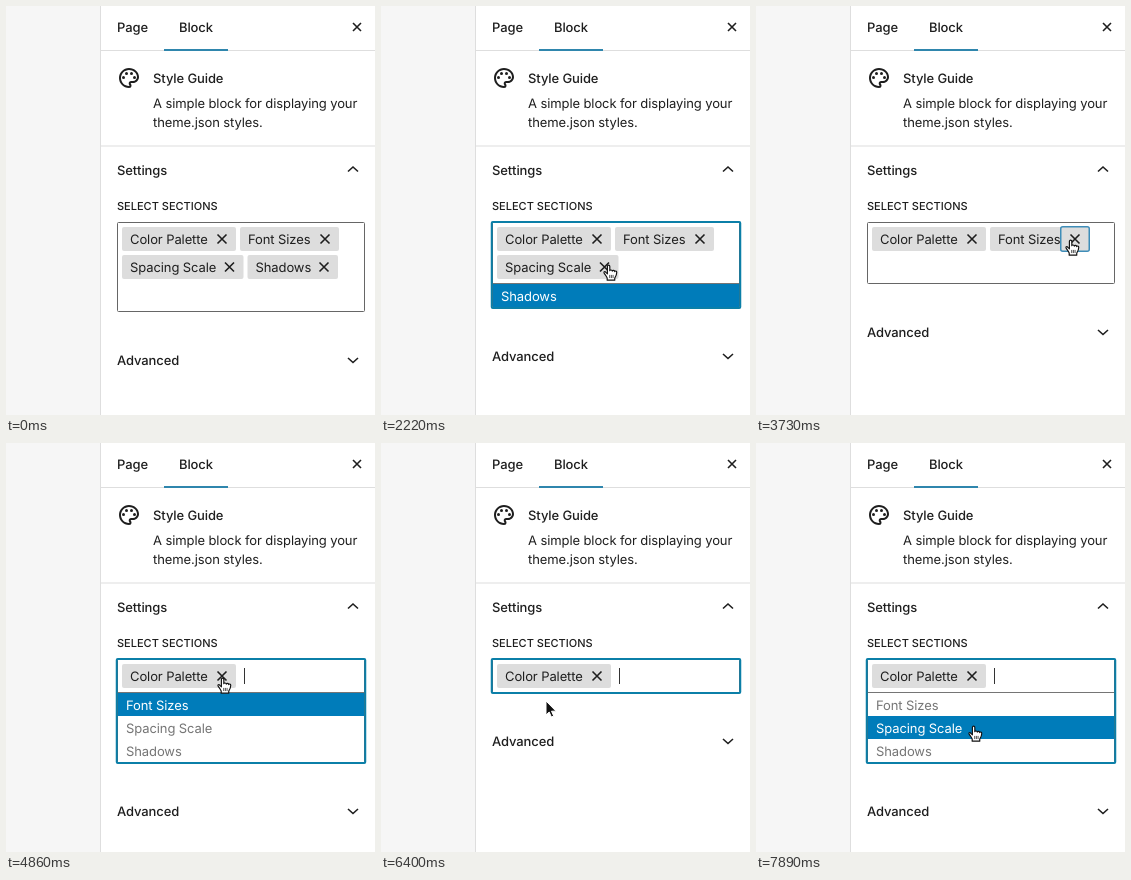
An HTML page that plays this animation: 369x409 px, repeating every 8000 ms.

```html
<!DOCTYPE html>
<html lang="en">
<head>
<meta charset="utf-8">
<title>Block settings</title>
<style>
  html, body { margin: 0; width: 100%; height: 100%; overflow: hidden; background: #fff; }
  svg { display: block; }
  text {
    font: 13px Inter, "Liberation Sans", sans-serif; letter-spacing: -.1px;
    fill: #1e1e1e; text-rendering: geometricPrecision;
  }
  .medium { font-weight: 500; }
  .label { font-size: 11px; font-weight: 500; letter-spacing: 0; }
  .line { fill: none; stroke: #1e1e1e; stroke-width: 1.6; }
  .rule { fill: #dedede; }
  .tab { fill: #2f86ad; }
  .ring { fill: none; stroke: #0b7fa8; stroke-width: 2; }
  .press { fill: none; stroke: #3f8db8; stroke-width: 1.5; }
  .box { fill: #fff; stroke: #666; stroke-width: 1; }
  .token { fill: #ddd; }
  .option { fill: #757575; }
  .bar { fill: #007cba; }
  .picked { fill: #fff; }
  .caret { fill: #333; }
  .hand { fill: #fff; stroke: #111; stroke-width: 1.1; stroke-linejoin: round; }
  .arrow { fill: #111; stroke: #fff; stroke-width: 1; }
  .beam { fill: none; stroke: #333; stroke-width: 1; }
</style>
</head>
<body>
<svg width="369" height="409" viewBox="0 0 369 409">
  <rect width="94" height="409" fill="#f6f6f6"/>
  <rect class="rule" x="94" width="1" height="409"/>
  <rect class="rule" x="95" y="44" width="274" height="1"/>
  <rect class="rule" x="95" y="139.5" width="274" height="1"/>
  <rect class="tab" x="158" y="43" width="64" height="2"/>

  <text class="medium" x="111" y="25.5">Page</text>
  <text class="medium" x="173" y="25.5">Block</text>
  <path class="line" d="M347 17l8 8m0-8l-8 8"/>

  <g transform="translate(111 60)" fill="#1e1e1e">
    <path d="M12 22C6.5 22 2 17.5 2 12S6.5 2 12 2s10 4 10 9c0 3.3-2.7 6-6 6h-1.8c-.3 0-.5.2-.5.5 0 .1 0 .2.1.3.4.5.7 1.1.7 1.7A2.5 2.5 0 0 1 12 22zm0-18c-4.4 0-8 3.6-8 8s3.6 8 8 8c.3 0 .5-.2.5-.5a.5.5 0 0 0-.1-.3c-.4-.5-.7-1.1-.7-1.7a2.5 2.5 0 0 1 2.5-2.5H16c2.2 0 4-1.8 4-4 0-3.9-3.6-7-8-7z"/>
    <circle cx="6.5" cy="11.5" r="1.5"/><circle cx="9.5" cy="7.5" r="1.5"/>
    <circle cx="14.5" cy="7.5" r="1.5"/><circle cx="17.5" cy="11.5" r="1.5"/>
  </g>
  <text class="medium" x="147" y="76.5">Style Guide</text>
  <text x="147" y="102">A simple block for displaying your</text>
  <text x="147" y="120.5">theme.json styles.</text>

  <text class="medium" x="111" y="168.5">Settings</text>
  <path class="line" d="M342 165.500l5-4.500 5 4.500"/>
  <text class="label" x="111" y="204">SELECT SECTIONS</text>

  <g id="field"></g>
  <g id="advanced">
    <text class="medium" x="111" y="4.5">Advanced</text>
    <path class="line" d="M342-2l5 4.500 5-4.500"/>
  </g>

  <g id="cursor">
    <g id="hand" class="hand" transform="translate(-6.8 -8.6) scale(1.05)">
      <path d="M4 9L2.6 7.6C1.6 6.4.2 7 .9 8.3 2 10 3 11 3.8 13v2H11v-2c1.5-2 1.9-3.5 1.9-5.5 0-1.5-1.7-1.5-1.9-.5-.1-1.7-2.1-1.7-2.3-.5C8.5 5 6.5 5 6.3 6V2C6.3.2 4 .2 4 2z"/>
      <path d="M6.2 10v3M7.8 10v3M9.4 10v3" stroke-width=".7"/>
    </g>
    <path id="arrow" class="arrow" d="M-5-8V6l3.2-3 2.2 5 2.3-1-2.2-4.8H5z"/>
    <path id="beam" class="beam" d="M-2.500-6.500Q0-6.500 0-5 0-6.500 2.500-6.500M0-5V5M-2.500 6.500Q0 6.500 0 5 0 6.500 2.500 6.500M-1.500 2h3"/>
  </g>
</svg>
<script>
const LOOP = 8000, TOP = 216, ROW = 28, ITEM = 23;
const $ = id => document.getElementById(id);

const sections = [
  { name: "Color Palette", x: 116, row: 0, w: 114 },
  { name: "Font Sizes", x: 234, row: 0, w: 99 },
  { name: "Spacing Scale", x: 116, row: 1, w: 121.5 },
  { name: "Shadows", x: 241.5, row: 1, w: 90.5 }
];
const rowsFor = [1, 1, 2, 2, 3];
const caretFor = [[120, 225], [238, 225], [120, 253], [246, 253]];

// time, tokens left, mode
const steps = [
  [0, 4, "idle"], [1300, 4, "press"], [1550, 3, "open"],
  [2320, 3, "press"], [2500, 2, "open"],
  [3630, 2, "press"], [3990, 1, "open"],
  [4910, 1, "press"], [5090, 0, "open"],
  [6400, 1, "focus"], [7300, 1, "open"]
];

const caretOn = [[1550, 2090], [2500, 3000], [3500, 3630], [3990, 4490],
  [4860, 4910], [5090, 5590], [6090, 7390], [7890, 8000]];

// time, centre x, centre y, shape from that time on
const path = [
  [390, 338, 392, "arrow"], [610, 334, 364, "arrow"], [790, 334, 364, "arrow"],
  [1070, 320, 268, "hand"], [1650, 320, 268, "beam"], [2000, 238, 266, "hand"],
  [2220, 229, 267, "hand"], [2670, 229, 267, "beam"], [3300, 306, 246, "hand"],
  [3460, 316, 242, "hand"], [4250, 316, 242, "hand"], [4690, 219, 243, "hand"],
  [4860, 218, 243, "hand"], [5240, 218, 243, "beam"], [5420, 218, 243, "hand"],
  [5670, 170, 285, "hand"], [5770, 170, 318, "hand"], [5860, 168, 292, "hand"],
  [5950, 168, 269, "hand"], [6100, 170, 266, "hand"], [6400, 170, 266, "arrow"],
  [6820, 170, 266, "arrow"], [7080, 254, 235, "beam"], [7300, 254, 235, "beam"],
  [7400, 246, 245, "hand"], [7560, 228, 266, "hand"], [7750, 220, 286, "hand"],
  [7890, 219, 291, "hand"]
];

const lastAt = (list, t) => list.findLastIndex(k => k[0] <= t);

function cursorAt(t) {
  const i = lastAt(path, t);
  if (i < 0) return null;
  const a = path[i], b = path[i + 1] || a;
  const p = b === a ? 0 : (t - a[0]) / (b[0] - a[0]);
  const e = p * p * (3 - 2 * p);
  return { x: a[1] + (b[1] - a[1]) * e, y: a[2] + (b[2] - a[2]) * e, shape: a[3] };
}

const rect = (cls, x, y, w, h, r = 0) =>
  `<rect class="${cls}" x="${x}" y="${y}" width="${w}" height="${h}" rx="${r}"/>`;
const text = (cls, x, y, s) => `<text class="${cls}" x="${x}" y="${y}">${s}</text>`;

function token(s, pressed) {
  const y = 221 + s.row * ROW, bx = s.x + s.w - 28;
  return rect("token", s.x, y, s.w, 24, 2) + text("", s.x + 8, y + 16.7, s.name) +
    `<path class="line" d="M${bx + 9.5} ${y + 7.5}l9 9m0-9l-9 9"/>` +
    (pressed ? rect("press", bx - .25, y - .25, 28.5, 24.5, 2) : "");
}

let drawn = "";

function draw(t) {
  const [, count, mode] = steps[lastAt(steps, t)];
  const cursor = cursorAt(t);
  const focused = mode === "open" || mode === "focus";
  const options = mode === "open" ? sections.slice(count) : [];
  const listTop = TOP + 6 + ROW * rowsFor[count];
  const bottom = listTop + (options.length ? options.length * ITEM + 1 : 0);
  const caret = focused && caretOn.some(([a, b]) => t >= a && t < b);

  const over = cursor ? Math.floor((cursor.y - 6 - listTop) / ITEM) : 0;
  const picked = over >= 0 && over < options.length ? over : 0;

  const key = [count, mode, picked, caret].join();
  if (key !== drawn) {
    drawn = key;
    let out = rect("box", 111.5, TOP + .5, 247, bottom - TOP - 1, 1);
    out += sections.slice(0, count)
      .map((s, i) => token(s, mode === "press" && i === count - 1)).join("");
    if (options.length) out += rect("option", 112, listTop - 1, 246, 1);
    options.forEach((s, i) => {
      const y = listTop + i * ITEM, on = i === picked;
      if (on) out += rect("bar", 112, y, 246, ITEM);
      out += text(on ? "picked" : "option", 120, y + 16.5, s.name);
    });
    if (focused) out += rect("ring", 110.75, TOP, 248.5, bottom - TOP, 1);
    if (caret) out += rect("caret", ...caretFor[count], 1, 16);
    $("field").innerHTML = out;
    $("advanced").setAttribute("transform", `translate(0 ${bottom + 48})`);
  }

  $("cursor").style.display = cursor ? "" : "none";
  if (cursor) {
    $("cursor").setAttribute("transform", `translate(${cursor.x} ${cursor.y})`);
    for (const id of ["hand", "arrow", "beam"])
      $(id).style.display = id === cursor.shape ? "" : "none";
  }
}

const start = performance.now();
function tick() {
  draw((performance.now() - start) % LOOP);
  requestAnimationFrame(tick);
}
tick();
</script>
</body>
</html>
```
